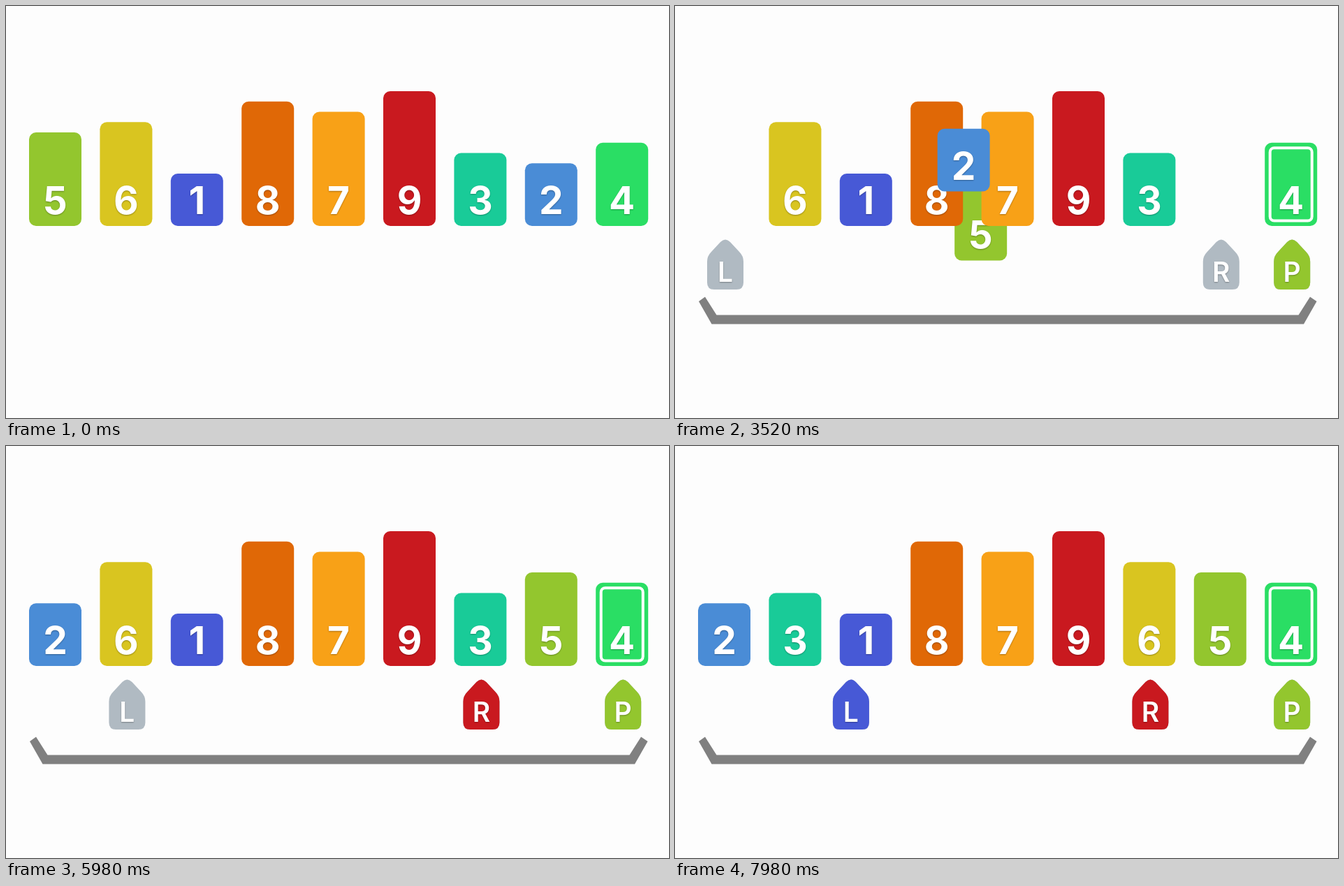
Animation, 949 px wide and 590 px high, one loop 8000 ms. Source, as an HTML page:

```html
<!DOCTYPE html>
<html lang="en">
<head>
<meta charset="utf-8">
<title>Quicksort partition</title>
<style>
html, body { margin: 0; width: 100%; height: 100%; overflow: hidden; background: #fdfdfd; }
svg { display: block; width: 949px; height: 590px; }
text { font-family: Inter, "Liberation Sans", sans-serif; fill: #fff; text-anchor: middle; text-shadow: 0 1px 2px rgba(0, 0, 0, .32); }
.digit { font-size: 55px; font-weight: 700; }
.letter { font-size: 39px; font-weight: 600; }
</style>
</head>
<body>
<svg id="stage" viewBox="0 0 949 590"></svg>
<script>
const LOOP = 8000, FIRST_X = 33, PITCH = 101.4, BAR_WIDTH = 75, FLOOR = 315, ARC = 49.5;
const COLORS = ['', '#4759d6', '#4a8cd6', '#19cb98', '#2ade64', '#93c62e', '#d9c520', '#f8a117', '#e06806', '#c9191f'];
const IDLE = '#b0bac2';
const START = [5, 6, 1, 8, 7, 9, 3, 2, 4];
// Paint order: bars that dip travel behind the others, bars that rise in front.
const PAINT = [5, 6, 1, 8, 7, 9, 4, 3, 2];
const SWAPS = [
  { start: 3010, length: 1000, down: 5, up: 2, from: 0, to: 7 },
  { start: 6620, length: 1000, down: 6, up: 3, from: 1, to: 6 }
];
// moves: [start, length, slots]; tints: [start, length, active]
const MARKERS = {
  L: { slot: 0, color: COLORS[1], shown: 1200,
       moves: [[4015, 520, 1], [7625, 520, 1]],
       tints: [[1950, 160, 0], [4000, 160, 1], [5050, 160, 0], [7610, 160, 1]] },
  R: { slot: 7, color: COLORS[9], shown: 1200,
       moves: [[5430, 520, -1]],
       tints: [[2840, 160, 0], [4000, 160, 1], [6450, 160, 0], [7610, 160, 1]] },
  P: { slot: 8, color: COLORS[5], shown: 700, moves: [], tints: [] }
};

const stage = document.getElementById('stage');
const ramp = (t, start, length) => Math.min(1, Math.max(0, (t - start) / length));
const ease = u => (1 - Math.cos(Math.PI * u)) / 2;

function add(parent, tag, attrs = {}, content = '') {
  const node = document.createElementNS('http://www.w3.org/2000/svg', tag);
  for (const key in attrs) node.setAttribute(key, attrs[key]);
  node.textContent = content;
  return parent.appendChild(node);
}

const place = (node, x, y) => node.setAttribute('transform', `translate(${x.toFixed(2)} ${y.toFixed(2)})`);

const bracket = add(stage, 'path', {
  d: 'M34 423L43 416.5L59.5 442.5H892.5L909 416.5L918.5 423L900 455.5H52.5Z', fill: '#808080'
});

let outline;
const bars = PAINT.map(value => {
  const group = add(stage, 'g'), height = 75 + 14.75 * (value - 1);
  add(group, 'rect', { y: -height, width: BAR_WIDTH, height, rx: 10, fill: COLORS[value] });
  if (value === 4) {
    outline = add(group, 'rect', {
      x: 7.5, y: 7.5 - height, width: 60, height: height - 15, rx: 6,
      fill: 'none', stroke: '#fff', 'stroke-width': 4
    });
  }
  add(group, 'text', { class: 'digit', x: BAR_WIDTH / 2, y: -17 }, value);
  return { value, group };
});

const markers = Object.entries(MARKERS).map(([name, spec]) => {
  const group = add(stage, 'g');
  const attrs = {
    d: 'M-26 32Q-26 24 -20 18L-7 4Q0 -3 7 4L20 18Q26 24 26 32V62Q26 72 16 72H-16Q-26 72 -26 62Z'
  };
  add(group, 'path', { ...attrs, fill: IDLE });
  const tint = add(group, 'path', { ...attrs, fill: spec.color });
  add(group, 'text', { class: 'letter', x: 0, y: 61 }, name);
  return { ...spec, group, tint };
});

function barPose(value, t) {
  let slot = START.indexOf(value), lift = 0;
  for (const swap of SWAPS) {
    const sign = value === swap.down ? 1 : value === swap.up ? -1 : 0;
    const u = ramp(t, swap.start, swap.length);
    slot += sign * (swap.to - swap.from) * ease(u);
    lift += sign * ARC * Math.sin(Math.PI * u);
  }
  return [FIRST_X + PITCH * slot, FLOOR + lift];
}

function draw(t) {
  bracket.setAttribute('opacity', ramp(t, 200, 400));
  outline.setAttribute('opacity', ramp(t, 700, 400));
  for (const { value, group } of bars) place(group, ...barPose(value, t));
  for (const m of markers) {
    const slot = m.moves.reduce((s, [start, length, by]) => s + by * ease(ramp(t, start, length)), m.slot);
    const active = m.tints.reduce((a, [start, length, to]) => a + (to - a) * ramp(t, start, length), 1);
    place(m.group, FIRST_X + BAR_WIDTH / 2 + 1.5 + PITCH * slot, 334);
    m.group.setAttribute('opacity', ramp(t, m.shown, 400));
    m.tint.setAttribute('opacity', active);
  }
}

const began = performance.now();
function tick() {
  draw((performance.now() - began) % LOOP);
  requestAnimationFrame(tick);
}
tick();
</script>
</body>
</html>
```
